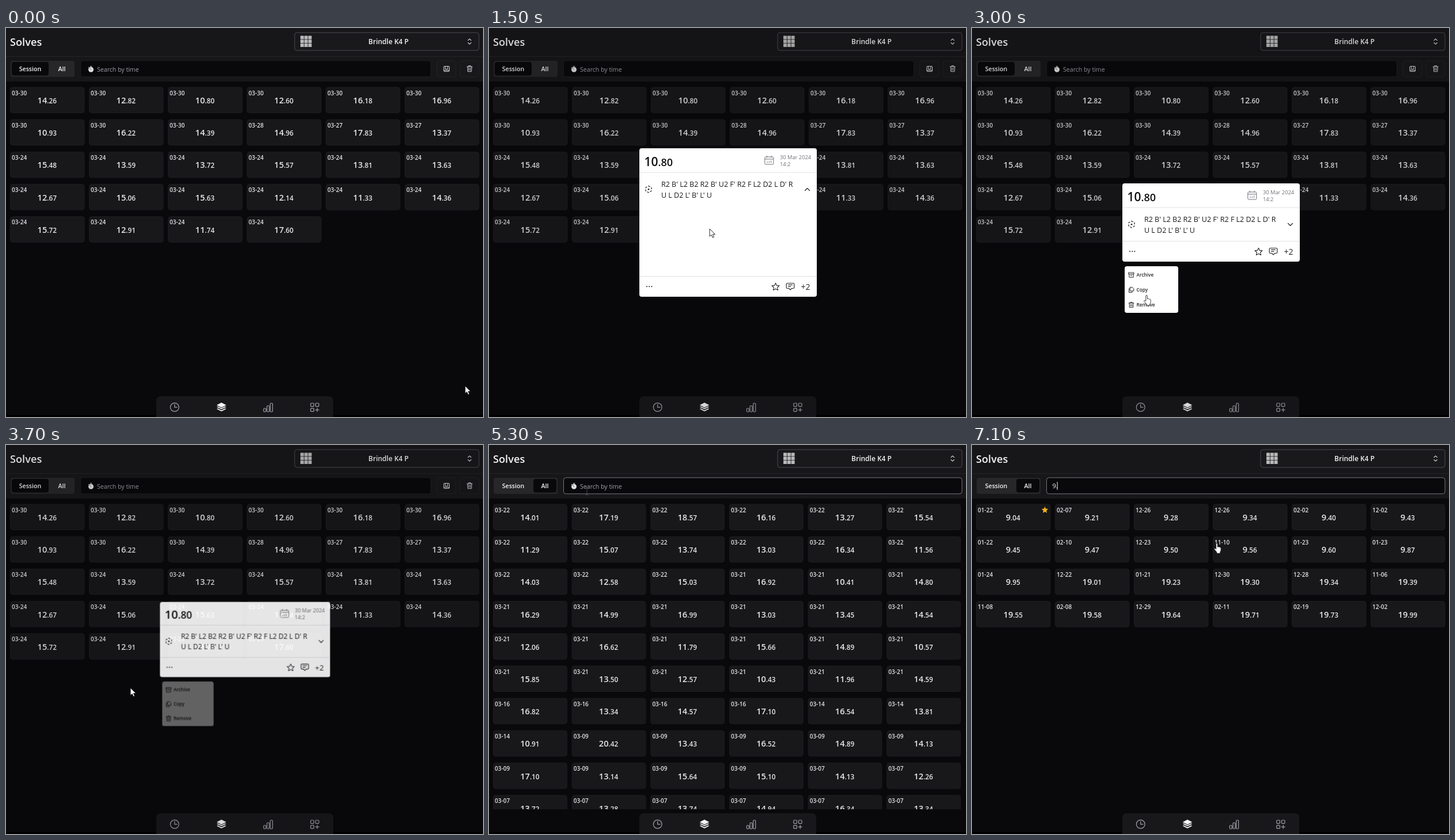
These frames come from a looping animation (828x676 px, 7200 ms). An HTML page:

```html
<!DOCTYPE html>
<html lang="en">
<head>
<meta charset="utf-8">
<title>Solves</title>
<style>
html, body { margin: 0; width: 100%; height: 100%; overflow: hidden; background: #09090b; }
svg { display: block; width: 828px; height: 676px; font-family: "Open Sans", "Noto Sans", sans-serif; }
.line { fill: none; stroke-linecap: round; stroke-linejoin: round; }
.semi { font-weight: 600; }
.mid { text-anchor: middle; }
</style>
</head>
<body>
<svg id="stage" viewBox="0 0 828 676"></svg>
<script>
const LOOP = 7200;
const OPEN = 900, COLLAPSE = 1850, MENU = 2390, MENU_CLOSE = 3600, CLOSE = 3675;
const SHOW_ALL = 4200, FOCUS = 4800, TYPE_NINE = 5500, TYPE_DOT = 5700;

// A date applies to every time that follows it.
const SESSION = `03-30 14.26 12.82 10.80 12.60 16.18 16.96 10.93 16.22 14.39 03-28 14.96
  03-27 17.83 13.37 03-24 15.48 13.59 13.72 15.57 13.81 13.63 12.67 15.06 15.63 12.14
  11.33 14.36 15.72 12.91 11.74 17.60`;
const ALL = `03-22 14.01 17.19 18.57 16.16 13.27 15.54 11.29 15.07 13.74 13.03 16.34 11.56
  14.03 12.58 15.03 03-21 16.92 10.41 14.80 16.29 14.99 16.99 13.03 13.45 14.54 12.06 16.62
  11.79 15.66 14.89 10.57 15.85 13.50 12.57 10.43 11.96 14.59 03-16 16.82 13.34 14.57 17.10
  03-14 16.54 13.81 10.91 03-09 20.42 13.43 16.52 14.89 14.13 17.10 13.14 15.64 15.10
  03-07 14.13 12.26 13.72 13.28 13.74 14.94 16.34 13.34`;
const FOUND = `01-22 9.04 02-07 9.21 12-26 9.28 9.34 02-02 9.40 12-02 9.43 01-22 9.45 02-10 9.47
  12-23 9.50 11-10 9.56 01-23 9.60 9.87 01-24 9.95 12-22 19.01 01-21 19.23 12-30 19.30
  12-28 19.34 11-06 19.39 11-08 19.55 02-08 19.58 12-29 19.64 02-11 19.71 02-19 19.73 12-02 19.99`;

const rect = (x, y, w, h, r, fill, more = '') =>
  `<rect x="${x}" y="${y}" width="${w}" height="${h}" rx="${r}" fill="${fill}" ${more}/>`;
const line = (d, color, width = 1.2, more = '') =>
  `<path class="line" d="${d}" stroke="${color}" stroke-width="${width}" ${more}/>`;
const text = (x, y, size, fill, body, cls = '') =>
  `<text x="${x}" y="${y}" font-size="${size}" fill="${fill}" class="${cls}">${body}</text>`;
const group = (id, body) => `<g id="${id}">${body}</g>`;
const at = (x, y, body) => `<g transform="translate(${x} ${y})">${body}</g>`;

function star(cx, cy, r, style) {
  const points = Array.from({ length: 10 }, (_, i) => {
    const a = i * Math.PI / 5, d = i % 2 ? r * .48 : r;
    return `${(cx + d * Math.sin(a)).toFixed(1)},${(cy - d * Math.cos(a)).toFixed(1)}`;
  });
  return `<polygon points="${points.join(' ')}" stroke-linejoin="round" ${style}/>`;
}

function cards(list, pitch, width) {
  let date, n = 0, out = '';
  for (const word of list.trim().split(/\s+/)) {
    if (word.includes('-')) { date = word; continue; }
    const x = 7.5 + n % 6 * pitch, y = 103 + Math.floor(n / 6) * 56.2;
    const [whole, part] = word.split('.');
    out += rect(x, y, width, 44.5, 4, '#18181b', 'stroke="#1d1d20"')
      + text(x + 2.6, y + 13.6, 10, '#e4e4e7', date, 'semi')
      + text(x + width / 2 - .5, y + 28, 14.6, '#e8e8ea', `${whole}<tspan font-size="11.8">.${part}</tspan>`, 'semi mid');
    n++;
  }
  return out;
}

function header() {
  let cube = '';
  for (let i = 0; i < 9; i++) cube += rect(511 + i % 3 * 6.8, 13.5 + Math.floor(i / 3) * 6.8, 6, 6, .5, '#b8b8b8');
  return rect(0, 0, 828, 93, 0, '#17171a') + rect(0, 49, 828, 1, 0, '#242427')
    + text(7, 31, 18.2, '#f4f4f5', 'Solves', 'semi')
    + rect(501, 8, 320, 31, 4, '#19191c', 'stroke="#4b4b50"') + cube
    + text(664, 28, 12, '#f4f4f5', 'Brindle K4 P', 'semi mid')
    + line('M802 21.5l2.7-2.7 2.7 2.7M802 25.5l2.7 2.7 2.7-2.7', '#d4d4d8', 1.1)
    + rect(8, 57, 111, 28, 4, '#27272a');
}

function toolbar() {
  const trash = line('M800.3 67.2h9M803 67v-1.4h3.6V67M801.2 67.4l.5 8.3h6.2l.5-8.3M803.6 69.5v4M806 69.5v4', '#d4d4d8', 1);
  const book = rect(760, 66.5, 9.5, 9, 1.5, 'none', 'stroke="#d4d4d8" stroke-width="1.1"')
    + line('M762.7 67v4.6h4V67M760.5 73.6h8.5', '#d4d4d8', 1);
  return rect(0, 0, 0, 28, 4, '#09090b', 'id="field"')
    + group('buttons', [748, 788].map(x => rect(x, 57, 33, 28, 4, '#18181b', 'stroke="#232326"')).join('') + book + trash)
    + rect(0, 59, 0, 23.5, 4, '#09090b', 'id="tab"')
    + text(42, 75, 10.7, '#f4f4f5', 'Session', 'semi mid') + text(97, 75, 10.7, '#f4f4f5', 'All', 'semi mid')
    + group('hint', '<circle cx="147.5" cy="72.3" r="4.5" fill="#e0e0e0"/>'
      + line('M146.3 66.6h2.4M143.3 68.3l.8.8', '#bdbdbd', 1.2) + line('M147.5 72.3l-2-2', '#44403c', 1)
      + text(158, 75.5, 10.6, '#a1a1aa', 'Search by time'))
    + '<text id="query" x="139.5" y="75.3" font-size="11" fill="#f4f4f5"></text>'
    + rect(0, 64, 1, 14, 0, '#f4f4f5', 'id="caret"');
}

function nav() {
  const c = '#a1a1aa';
  const box = (x, y, h) => rect(x, y, h ? 4 : 5.6, h || 5.6, 1.2, 'none', `stroke="${c}" stroke-width="1.2"`);
  return rect(0, 672.5, 828, 4, 0, '#000')
    + '<path d="M261 676V648q0-8 8-8h291q8 0 8 8v28z" fill="#18181b"/>'
    + `<circle cx="292.7" cy="659" r="7.4" fill="none" stroke="${c}" stroke-width="1.2"/>` + line('M292.7 654v5.2h4.3', c)
    + '<path d="M374 651l8.3 4.2-8.3 4.2-8.3-4.2z" fill="#f4f4f5"/>'
    + ['658.4', '662'].map(y => `<path d="M365.7 ${y}l2-1 6.3 3.2 6.3-3.2 2 1-8.3 4.2z" fill="#f4f4f5"/>`).join('')
    + box(447.3, 661, 6) + box(453, 656.5, 10.5) + box(458.7, 652, 15)
    + box(528.8, 652) + box(537.4, 652) + box(528.8, 660.8) + line('M540.2 660.6v6M537.2 663.6h6', c);
}

function modal() {
  const gray = '#71717a', ink = '#27272a';
  const top = text(269.5, 30.5, 21, '#111', '10<tspan font-size="18">.80</tspan>', 'semi')
    + line('M478.8 16.5q0-1.5 1.5-1.5h12q1.5 0 1.5 1.5v10q0 1.5-1.5 1.5h-12q-1.5 0-1.5-1.5zM479 18.8h14.6M482.4 13.2v2.4M490.2 13.2v2.4M483 25v-1.6M486.3 25v-2.2M489.6 25v-3.2', gray, 1)
    + text(505, 18.5, 9.3, gray, '30 Mar 2024') + text(505, 31.2, 9.3, gray, '14:2')
    + rect(261, 41.5, 308, 1, 0, '#e2e2e5')
    + line('M277 65.5l5 2.8v5.8l-5 2.9-5-2.9v-5.8z', ink, 1.3, 'stroke-dasharray="2.4 3.3"')
    + '<circle cx="277" cy="71.3" r="1.4" fill="#27272a"/>'
    + text(299, 66.5, 12.5, '#18181b', "R2 B' L2 B2 R2 B' U2 F' R2 F L2 D2 L D' R")
    + text(299, 85.8, 12.5, '#18181b', "U L D2 L' B' L' U")
    + line('', ink, 1.2, 'id="chevron"');
  const bottom = rect(261, -36, 308, 1, 0, '#e2e2e5')
    + [274, 278.2, 282.4].map(x => `<circle cx="${x}" cy="-17.8" r="1" fill="#18181b"/>`).join('')
    + star(497.5, -17, 6.8, `fill="none" stroke="${ink}" stroke-width="1.1"`)
    + line('M518 -23.5h10q1.8 0 1.8 1.8v5.4q0 1.8-1.8 1.8h-2.6l-2.4 2.6-2.4-2.6h-2.6q-1.8 0-1.8-1.8v-5.4q0-1.8 1.8-1.8zM519.6 -20.6h6.8M519.6 -17.6h4.2', ink, 1.2)
    + text(541.5, -12, 14, ink, '+2');
  const icons = ['M-4.5-4h9v2.6h-9zM-3.7-1.2v5.4h7.4v-5.4M-1.3 1h2.6',
    'M-1.8-4.5h3.4l2.7 2.7v3.8h-6.1zM-2-2h-2v6.6h5.4v-2', 'M-4.4-3h8.8M-1.6-3v-1.5h3.2V-3M-3.5-3l.4 7.6h6.2l.4-7.6M-1.2-.8v3.4M1.2-.8v3.4'];
  const items = ['Archive', 'Copy', 'Remove'].map((name, i) =>
    at(276.5, 429 + i * 26, line(icons[i], '#27272a', 1) + text(9, 3, 8.3, '#27272a', name, 'semi'))).join('');
  return rect(0, 0, 828, 676, 0, '#000', 'id="shade"')
    + group('modal', rect(261, 0, 308, 0, 4, '#fff', 'id="panel"') + group('top', top) + group('bottom', bottom)
      + group('menu', rect(265, 414, 93, 81, 4, '#fff') + items));
}

const pointers =
  '<path id="arrow" d="M0 0v13.2l3-2.8 2.2 4.8 2.2-1-2.1-4.6h4.2z" fill="#fff" stroke="#111" stroke-width=".9"/>'
  + '<path id="hand" d="M-1.3 1.2q0-1.4 1.3-1.4t1.3 1.4v5q1-.8 2 .1 1.1-.6 2 .4 1.6-.3 1.8 1.4v4.2l-1.3 2.8v2.2h-6v-2l-3.8-4.6q-.9-1.3.2-1.9t2.5 1.3z" fill="#fff" stroke="#111" stroke-width=".8"/>'
  + line('M-2.5-6.5h2l.5.5.5-.5h2M0-6V6M-2.5 6.5h2L0 6l.5.5h2', '#4a4a4e', 1, 'id="beam"');

const stage = document.getElementById('stage');
stage.innerHTML = '<clipPath id="view"><path d="M0 93h828v540H0z"/></clipPath>'
  + rect(0, 0, 828, 676, 0, '#09090b')
  + '<g clip-path="url(#view)">' + group('session', cards(SESSION, 137, 128.5)) + group('all', cards(ALL, 136.65, 127.8))
  + group('found', cards(FOUND, 137, 128.5) + star(126.5, 113, 6, 'fill="#f2b01e"')) + '</g>'
  + header() + toolbar() + nav() + modal() + group('cursor', pointers);

const el = Object.fromEntries([...stage.querySelectorAll('[id]')].map(e => [e.id, e]));
const set = (id, attrs) => { for (const k in attrs) el[id].setAttribute(k, attrs[k]); };
const show = (id, on) => { el[id].style.display = on ? '' : 'none'; };
const ramp = (t, start, length) => Math.min(1, Math.max(0, (t - start) / length));
const smooth = p => p * p * (3 - 2 * p);

// Pointer stops: time, x, y
const STOPS = [[0, 797, 622], [100, 797, 622], [750, 352, 128], [950, 352, 128], [1500, 383, 349],
  [1780, 552, 281], [1900, 552, 281], [2200, 279, 389], [2280, 279, 389], [2400, 287, 455],
  [2600, 300, 430], [2850, 302, 452], [3150, 304, 477], [3300, 304, 477], [3620, 216, 422],
  [3720, 216, 422], [4130, 108, 72], [4420, 108, 72], [4750, 170, 80], [6450, 170, 80], [7050, 425, 171], [LOOP, 425, 171]];
const SHAPES = [[0, 'arrow'], [420, 'hand'], [950, 'arrow'], [1740, 'hand'], [1960, 'arrow'], [2160, 'hand'],
  [3380, 'arrow'], [4080, 'hand'], [4540, 'beam'], [6580, 'hand']];

function drawPointer(t) {
  const i = Math.max(1, STOPS.findIndex(s => s[0] > t));
  const [t0, x0, y0] = STOPS[i - 1], [t1, x1, y1] = STOPS[i];
  const p = smooth(ramp(t, t0, t1 - t0));
  set('cursor', { transform: `translate(${x0 + (x1 - x0) * p} ${y0 + (y1 - y0) * p})` });
  const shape = SHAPES.filter(s => s[0] <= t).pop()[1];
  for (const id of ['arrow', 'hand', 'beam']) show(id, id === shape);
}

function drawModal(t) {
  const on = t >= OPEN && t < CLOSE + 250;
  show('modal', on);
  show('shade', on);
  if (!on) return;
  const alpha = t < CLOSE ? smooth(ramp(t, OPEN, 250)) : 1 - ramp(t, CLOSE, 250);
  const scale = .61 + .39 * alpha;
  const height = 258 - 122 * smooth(ramp(t, COLLAPSE, 250));
  const y = 338 - height / 2;
  set('shade', { opacity: .12 * alpha });
  set('modal', { opacity: alpha, transform: `translate(415 338) scale(${scale}) translate(-415 -338)` });
  set('panel', { y, height });
  set('top', { transform: `translate(0 ${y})` });
  set('bottom', { transform: `translate(0 ${y + height})` });
  set('chevron', { d: t < COLLAPSE ? 'M548.5 73.5l4-4 4 4' : 'M548.5 69.5l4 4 4-4' });
  set('menu', { opacity: ramp(t, MENU, 250) * (1 - ramp(t, MENU_CLOSE, 170)) });
}

function draw(t) {
  const all = t >= SHOW_ALL, focus = t >= FOCUS, typed = t >= TYPE_NINE;
  show('session', !all);
  show('all', all && !typed);
  show('found', typed);
  show('buttons', !all);
  show('hint', !typed);
  set('tab', all ? { x: 77, width: 40 } : { x: 10, width: 64 });
  set('field', { x: 129.5, y: 56.8, width: all ? 691.5 : 608, stroke: focus ? '#77777d' : '#1f1f22' });
  el.query.textContent = t >= TYPE_DOT ? '9.' : typed ? '9' : '';
  set('caret', { x: t >= TYPE_DOT ? 147.6 : typed ? 146 : 139.5 });
  show('caret', focus && ((t - FOCUS) % 1000 < 500 || (typed && t < 5800)));
  drawModal(t);
  drawPointer(t);
}

const begin = performance.now();
function tick() {
  draw((performance.now() - begin) % LOOP);
  requestAnimationFrame(tick);
}
tick();
</script>
</body>
</html>
```
